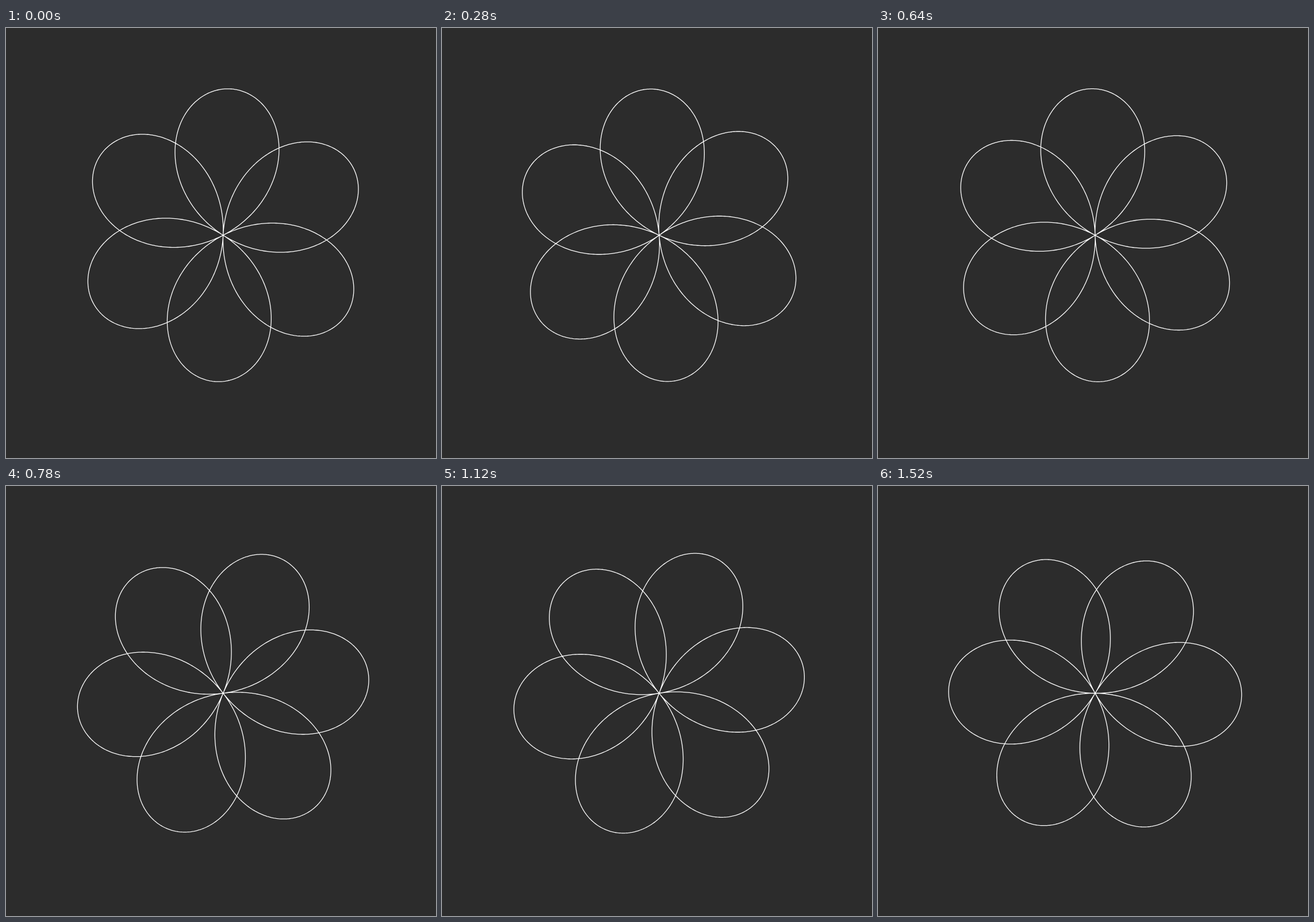
These frames come from a looping animation (748x748 px, 1.54 s). An HTML page with a canvas:

```html
<!DOCTYPE html>
<html lang="en">
<head>
<meta charset="utf-8">
<title>Turning rose</title>
<style>
  html, body { margin: 0; width: 100%; height: 100%; overflow: hidden; background: #2c2c2c; }
  canvas { display: block; }
</style>
</head>
<body>
<canvas id="stage" width="748" height="748"></canvas>
<script>
const ctx = document.getElementById('stage').getContext('2d');
const LOOP = 1540, TICK = 20;
const CENTER = { x: 377.7, y: 360.5 }, RADIUS = 254.9;
const START_ANGLE = 32.64 * Math.PI / 180;
const TURN = 0.02; // radians per turn step

// [tick, turn steps so far]: a nearly constant pace with a few small hitches
const PACE = [[0, 0], [14, 46], [25, 79], [39, 122], [56, 173], [69, 213], [76, 234]];

function turnsAt(tick) {
  const i = Math.max(1, PACE.findIndex(([end]) => tick <= end));
  const [t0, n0] = PACE[i - 1], [t1, n1] = PACE[i];
  return Math.round(n0 + (n1 - n0) * (tick - t0) / (t1 - t0));
}

// Rose r = R cos(3a/2), closed after two full turns
function rosePath(phase) {
  const points = 1440;
  ctx.beginPath();
  for (let i = 0; i < points; i++) {
    const a = i / points * 4 * Math.PI;
    const r = RADIUS * Math.cos(1.5 * a);
    ctx.lineTo(CENTER.x + r * Math.cos(a + phase), CENTER.y + r * Math.sin(a + phase));
  }
  ctx.closePath();
}

function draw(ms) {
  const tick = Math.floor((ms % LOOP) / TICK + 1e-6);
  ctx.fillStyle = '#2c2c2c';
  ctx.fillRect(0, 0, 748, 748);
  rosePath(START_ANGLE + TURN * turnsAt(Math.min(tick, 76)));
  ctx.strokeStyle = '#fff';
  ctx.lineWidth = 1.3;
  ctx.lineJoin = 'round';
  ctx.stroke();
}

const start = performance.now();
function frame() {
  draw(performance.now() - start);
  requestAnimationFrame(frame);
}
frame();
</script>
</body>
</html>
```
